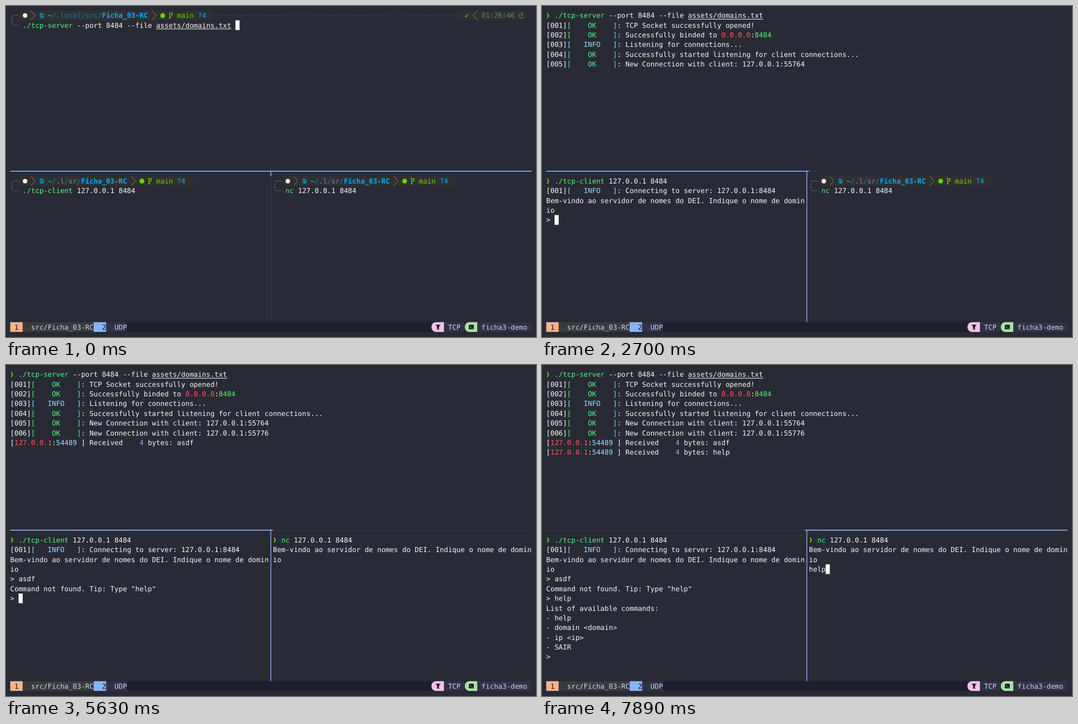
An HTML page for the animation above (8000 ms loop, 947 by 591 pixels).

```html
<!DOCTYPE html>
<html lang="en">
<head>
<meta charset="utf-8">
<title>TCP demo in a split terminal</title>
<style>
  html, body { margin: 0; width: 100%; height: 100%; overflow: hidden; background: #282a36; }
  svg { display: block; }
  text { font: 12.38px "DejaVu Sans Mono", "Noto Sans Mono", monospace; text-rendering: geometricPrecision; }
  .bold { font-weight: bold; }
</style>
</head>
<body>
<svg id="stage" width="947" height="591" viewBox="0 0 947 591"></svg>
<script>
const LOOP = 8000, CW = 7.452, RH = 17.385;
const X = col => 7.5 + col * CW;
const Y = row => 8.2 + row * RH;

// Colour keys used by the "§k" text markup
const INK = {
  w: '#f8f8f2', g: '#50fa7b', r: '#ff5555', c: '#8be9fd', p: '#bd93f9',
  b: '#00afff', a: '#00afff', d: '#0087af', s: '#8787af', m: '#5fd700',
  k: '#5faf00', t: '#5f8787', x: '#11111b', l: '#cdd6f4', u: '#f8f8f2'
};
const DIM = '#34374a', BLUE = '#82aaf2', PILL = '#303030', DARK = '#11111b';

const stage = document.getElementById('stage');
const layers = [], moves = [];

function add(parent, tag, attrs, content) {
  const node = document.createElementNS('http://www.w3.org/2000/svg', tag);
  for (const key in attrs) node.setAttribute(key, attrs[key]);
  if (content) node.textContent = content;
  return parent.appendChild(node);
}
const rect = (g, x, y, width, height, fill) => add(g, 'rect', { x, y, width, height, fill });
const dot = (g, cx, cy, r, fill) => add(g, 'circle', { cx, cy, r, fill });
const shape = (g, d, fill) => add(g, 'path', { d, fill });
const line = (g, d, stroke, width = 1) =>
  add(g, 'path', { d, stroke, 'stroke-width': width, fill: 'none' });
const cells = (g, col, row, count, fill) => rect(g, X(col), Y(row), count * CW, RH, fill);

function during(from, to = LOOP) {
  const node = add(stage, 'g', {});
  layers.push({ node, from, to });
  return node;
}

// Writes marked-up text on the cell grid
function write(g, col, row, markup) {
  const parts = ('§w' + markup).split(/§(\w)/).slice(1);
  for (let i = 0; i < parts.length; i += 2) {
    const [key, str] = [parts[i], parts[i + 1]];
    for (const run of str.matchAll(/\S+(?: \S+)*/g)) {
      add(g, 'text', {
        x: X(col + run.index), y: Y(row) + 13.1, fill: INK[key], class: key === 'b' ? 'bold' : ''
      }, run[0]);
    }
    if (key === 'u') rect(g, X(col), Y(row) + 14.9, str.length * CW, 1, INK.u);
    col += str.length;
  }
}

function pill(g, from, to, row) {
  add(g, 'rect', { x: X(from), y: Y(row), width: (to - from) * CW, height: RH, rx: 8, fill: PILL });
}

function chevron(g, col, row, dir = 1) {
  const tip = X(col + (dir > 0 ? 1 : 0)), back = tip - dir * CW;
  line(g, `M${back} ${Y(row) + .6}L${tip} ${Y(row) + RH / 2}L${back} ${Y(row) + RH - .6}`, '#8a8a8a');
}

function folder(g, col, row) {
  const x = X(col), y = Y(row) + 4.2;
  shape(g, `M${x + .6} ${y}h3.6l1 1.4h2.6v2.2h-5l-2.2 4z`, INK.d);
  shape(g, `M${x + 3.2} ${y + 4.3}h5.6l-1.4 4.7h-6.6z`, INK.d);
}

function branch(g, col, row) {
  const x = X(col), y = Y(row);
  line(g, `M${x + 2} ${y + 4}v10M${x + 6} ${y + 5}v2q0 2.5 -4 3.5`, INK.m, 1.2);
  for (const [dx, dy] of [[2, 4.5], [2, 13.5], [6, 5]]) dot(g, x + dx, y + dy, 1.3, INK.m);
}

// Two-line shell prompt; the path ends at column `end`
function prompt(g, col, row, path, end, command) {
  const x = X(col), y = Y(row) + RH / 2;
  line(g, `M${x + 14.9} ${y}h-8q-3.4 0 -3.4 3.4v${RH - 6.8}q0 3.4 3.4 3.4h8`, '#626262');
  end += col;
  pill(g, col + 2, end + 16, row);
  dot(g, x + 26.6, y + .2, 4, INK.w);
  chevron(g, col + 5, row);
  folder(g, col + 7, row);
  write(g, col + 9, row, path);
  chevron(g, end + 1, row);
  dot(g, X(end + 3) + 4.3, y + .2, 4.3, INK.m);
  branch(g, end + 5, row);
  write(g, end + 7, row, '§mmain §a?4');
  write(g, col + 3, row + 1, command);
}

// One-line prompt left behind once a command has run
function ran(g, col, row, command) {
  shape(g, `M${X(col) + 1.4} ${Y(row) + 4.2}h1.7l2.2 4.6l-2.2 4.6h-1.7l1.7 -4.6z`, INK.m);
  write(g, col + 2, row, command);
}

function log(g, row, key, label, message) {
  const pad = label === 'OK' ? ['    ', '    '] : ['   ', '   '];
  write(g, 0, row, `[00${row}]§${key}[${pad[0]}${label}${pad[1]}]§w: ${message}`);
}

const cursorTo = (time, pane, col, row) => moves.push({ time, pane, col, row });

function type(pane, col, row, word, times, until = LOOP) {
  [...word].forEach((ch, i) => {
    write(during(times[i], until), col + i, row, ch);
    cursorTo(times[i], pane, col + i + 1, row);
  });
}

function statusBar(g) {
  const row = 32, y = Y(row), mid = y + RH / 2;
  const cap = (col, fill) =>
    shape(g, `M${X(col + 3)} ${y}v${RH}H${X(col + 1)}a${CW} ${RH / 2} 0 0 1 0 ${-RH}z`, fill);
  cells(g, 0, row, 125, '#1e1e2e');
  cells(g, 0, row, 3, '#fab387');
  cells(g, 3, row, 17, '#393a3b');
  cells(g, 20, row, 3, '#89b4fa');
  cells(g, 23, row, 5, '#313244');
  cells(g, 104, row, 5, '#313244');
  cells(g, 112, row, 13, '#313244');
  cap(101, '#f5c2e7');
  cap(109, '#a6e3a1');
  write(g, 1, row, '§x1   §lsrc/Ficha_03-RC  §x2  §lUDP');
  write(g, 105, row, '§lTCP');
  write(g, 113, row, '§lficha3-demo');
  const px = X(102) + 4.4;
  dot(g, px, mid - 3.2, 1.6, DARK);
  line(g, `M${px - 3.8} ${mid - 4.4}l2.6 3.2h2.4l2.6 -3.2`, DARK, 1.4);
  shape(g, `M${px - 1.7} ${mid - 1.8}h3.4v7h-1.2v-3h-1v3h-1.2z`, DARK);
  const tx = X(110) + 4.2;
  add(g, 'rect', { x: tx - 4.4, y: mid - 4, width: 8.8, height: 8, rx: 1, fill: DARK });
  line(g, `M${tx - 2.6} ${mid - 2}l2 2l-2 2M${tx + .2} ${mid + 2.2}h2.6`, '#a6e3a1', 1);
}

// Pane borders
const EDGE = 294.8, SPLIT = X(62.5), BOTTOM = Y(32);
const base = add(stage, 'g', {});
line(base, `M${X(0)} ${EDGE}H${X(125)}M${SPLIT} ${EDGE}V${BOTTOM}`, DIM);
statusBar(base);
const focus = { top: [0, 125], left: [0, 63], right: [62, 125] };
for (const pane in focus) {
  const [from, to] = focus[pane], g = add(stage, 'g', {});
  line(g, `M${X(from)} ${EDGE}H${X(to)}`, BLUE, 1.7);
  if (pane === 'top') line(g, `M${SPLIT} ${EDGE + 1}V${Y(17)}`, '#c3cde6', 1.2);
  else line(g, `M${SPLIT} ${EDGE}V${BOTTOM}`, BLUE, 1.4);
  focus[pane] = g;
}

// Server pane
const SERVER = '§g./tcp-server§w --port 8484 --file §uassets/domains.txt';
let g = during(0, 900);
prompt(g, 0, 0, '§b~§d/.local/src/§bFicha_03-RC', 33, SERVER);
add(g, 'path', {
  d: `M${X(49.5) - .7} ${Y(.5) + .2}H${X(107)}`, stroke: '#6c6c6c', 'stroke-width': 1.4,
  'stroke-dasharray': `1.4 ${CW - 1.4}`
});
pill(g, 107, 124, 0);
write(g, 109, 0, '§k✔');
chevron(g, 111, 0, -1);
write(g, 113, 0, '§t01:26:46');
line(g, `M${X(122) + 7.4} ${Y(0) + 5.6}a4.2 4.2 0 1 0 0 6.4M${X(122) + 4.6} ${Y(0) + 6}v3h3`, INK.t, 1.1);

g = during(900);
ran(g, 0, 0, SERVER);
log(g, 1, 'g', 'OK', 'TCP Socket successfully opened!');
log(g, 2, 'g', 'OK', 'Successfully binded to §r0.0.0.0§w:§g8484');
log(g, 3, 'c', 'INFO', 'Listening for connections...');
log(g, 4, 'g', 'OK', 'Successfully started listening for client connections...');
log(during(2700), 5, 'g', 'OK', 'New Connection with client: 127.0.0.1:55764');
log(during(3370), 6, 'g', 'OK', 'New Connection with client: 127.0.0.1:55776');
const received = (time, row, word) =>
  write(during(time), 0, row, `[§r127.0.0.1§w:§c54489§w ] Received    §p4§w bytes: ${word}`);
received(5630, 7, 'asdf');
received(6850, 8, 'help');

// Client panes
const SHORT = '§b~§d/§s.l§d/§ssr§d/§bFicha_03-RC';
const CLIENT = '§g./tcp-client§w 127.0.0.1 8484', NC = '§gnc§w 127.0.0.1 8484';
function welcome(g, col, row) {
  write(g, col, row, 'Bem-vindo ao servidor de nomes do DEI. Indique o nome de domin');
  write(g, col, row + 1, 'io');
}
prompt(during(0, 2700), 0, 17, SHORT, 28, CLIENT);
prompt(during(0, 3370), 63, 17, SHORT, 28, NC);

g = during(2700);
ran(g, 0, 17, CLIENT);
write(g, 0, 18, '[001]§c[   INFO   ]§w: Connecting to server: 127.0.0.1:8484');
welcome(g, 0, 19);
write(g, 0, 21, '>');

g = during(3370);
ran(g, 63, 17, NC);
welcome(g, 63, 18);

g = during(5630);
write(g, 0, 22, 'Command not found. Tip: Type "help"');
write(g, 0, 23, '>');

g = during(6850);
['List of available commands:', '- help', '- domain <domain>', '- ip <ip>', '- SAIR', '>']
  .forEach((str, i) => write(g, 0, 24 + i, str));

// Cursor and focus, in order of time
cursorTo(0, 'top', 54, 1);
cursorTo(900, 'top', 0, 5);
cursorTo(1510, 'right', 83, 18);
cursorTo(1960, 'left', 30, 18);
cursorTo(2700, 'left', 2, 21);
cursorTo(3130, 'right', 83, 18);
cursorTo(3370, 'right', 63, 20);
cursorTo(4710, 'left', 2, 21);
type('left', 2, 21, 'asdf', [5390, 5440, 5440, 5490]);
cursorTo(5630, 'left', 2, 23);
type('left', 2, 23, 'help', [6440, 6500, 6570, 6630]);
cursorTo(6850, 'left', 2, 29);
cursorTo(7270, 'right', 63, 20);
type('right', 63, 20, 'help', [7660, 7740, 7810, 7890]);

const cursor = cells(stage, 0, 0, 1, INK.w);
const show = (node, on) => node.setAttribute('display', on ? 'inline' : 'none');

function draw() {
  const t = performance.now() % LOOP;
  for (const { node, from, to } of layers) show(node, t >= from && t < to);
  const now = moves.findLast(move => move.time <= t);
  cursor.setAttribute('x', X(now.col));
  cursor.setAttribute('y', Y(now.row));
  for (const pane in focus) show(focus[pane], pane === now.pane);
  requestAnimationFrame(draw);
}
draw();
</script>
</body>
</html>
```
